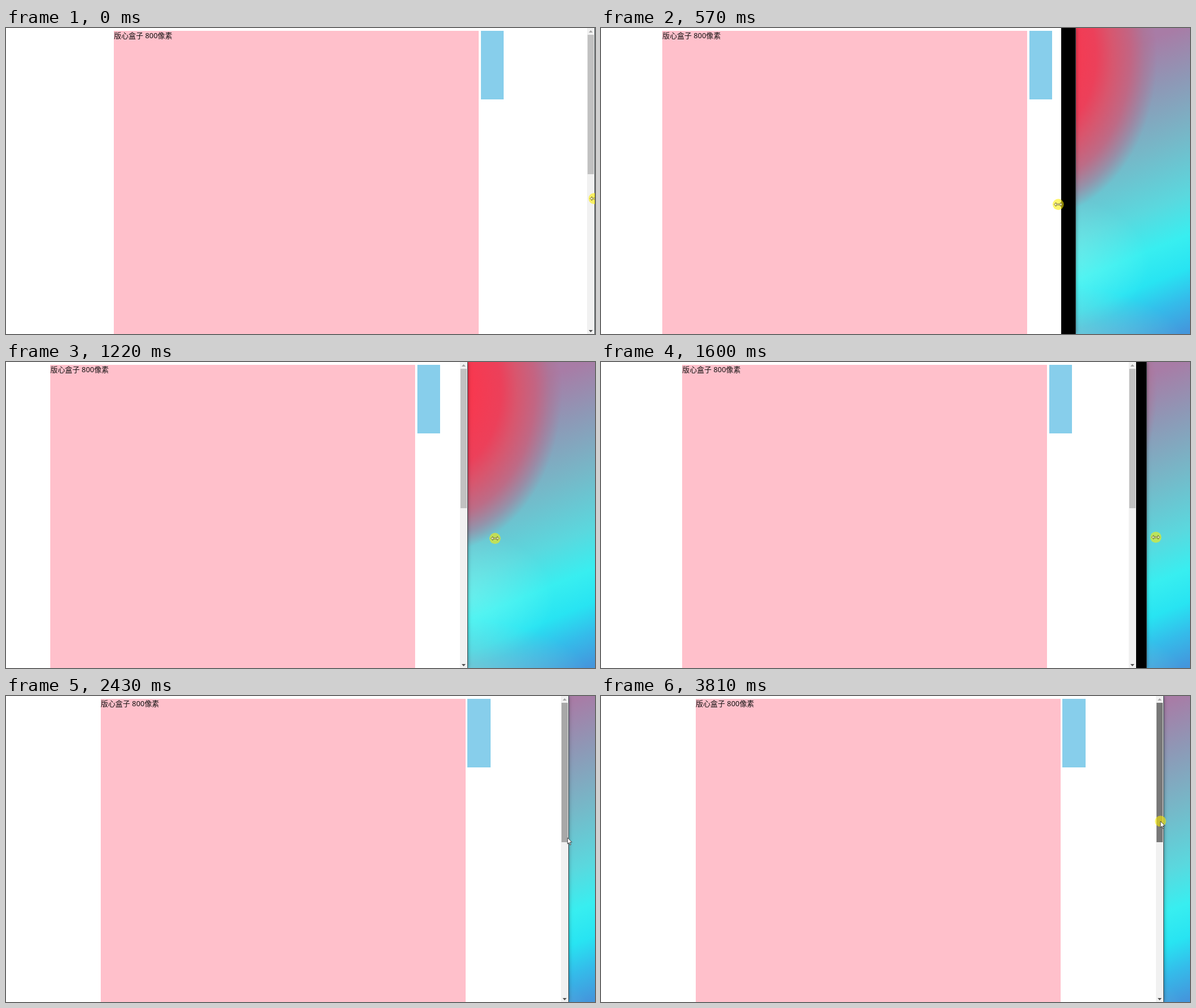
These frames come from a looping animation (1038x540 px, 3.86 s). An HTML page:

```html
<!DOCTYPE html>
<html lang="zh">
<head>
<meta charset="utf-8">
<title>版心盒子</title>
<style>
html, body { margin: 0; width: 100%; height: 100%; overflow: hidden; }
body { position: relative; }
div, svg { position: absolute; }
#wall {
  left: 760px; top: 0; width: 278px; height: 540px;
  background:
    radial-gradient(215px 285px at 5px 50px, #f8384f 0 25%, #ec405a 50%, #d8566e 63%, #c8607cd8 78%, #b0708f88 90%, #a080a000),
    radial-gradient(170px 120px at 35px 415px, #90fff477, #90fff400),
    radial-gradient(270px 110px at 0 560px, #8cc4ccee, #8cc4cc00),
    linear-gradient(158deg, #a87ca6 16%, #8e98b6 30%, #76b8c8 46%, #5ad8de 62%, #38eef0 73%, #28e4f2 82%, #34bcea 90%, #4496dc 99%);
}
#win { left: 0; top: 0; height: 540px; background: #000; box-shadow: 0 0 7px #0008; }
#win::after { content: ""; position: absolute; left: 100%; top: 0; width: 1px; height: 100%; background: #3a464a; }
#view { left: 0; top: 0; height: 100%; overflow: hidden; background: #fff; }
#box {
  top: 5px; width: 642.5px; height: 1122px; background: #ffc0cb; color: #111;
  font: 12.9px/17px "Noto Sans", "Noto Sans CJK SC", "Noto Sans CJK", sans-serif; white-space: nowrap;
}
#side { top: 5px; width: 40.2px; height: 121px; background: skyblue; }
#bar { top: 0; width: 13.5px; height: 540px; background: #f1f1f1; }
#thumb { left: 1px; top: 12px; width: 11px; height: 246px; }
#bar svg { left: 3px; width: 7px; height: 4px; }
#up { top: 4px; }
#down { top: 533px; fill: #505050; }
#cursor { left: 0; top: 0; width: 40px; height: 40px; margin: -20px 0 0 -20px; }
</style>
</head>
<body>
<div id="wall"></div>
<div id="win">
  <div id="view">
    <div id="box">版心盒子 800像素</div>
    <div id="side"></div>
    <div id="bar">
      <svg id="up" viewBox="0 0 7 4"><path d="M0 4L3.5 0 7 4Z"/></svg>
      <div id="thumb"></div>
      <svg id="down" viewBox="0 0 7 4"><path d="M0 0L3.5 4 7 0Z"/></svg>
    </div>
  </div>
</div>
<svg id="cursor" viewBox="-20 -20 40 40">
  <circle id="press" r="9.8" fill="#fff000" fill-opacity=".58"/>
  <path id="resize" d="M-7.3 0L-3.8-3.4V-1H3.8V-3.4L7.3 0 3.8 3.4V1H-3.8V3.4Z" fill="#fff" fill-opacity=".6" stroke="#5c5220" stroke-width=".8"/>
  <path id="arrow" d="M0 0V11L2.6 8.7 4.4 13 6.1 12.2 4.3 8H7.8Z" fill="#fff" stroke="#222" stroke-width=".8"/>
</svg>
<script>
const LOOP = 3860, START = 140, TICK = 50, BEAT = 280;
const GRAB_TIME = 2530, GRAB_Y = 257, SCROLL_RATIO = 2.19;
const $ = id => document.getElementById(id);
const [win, view, box, side, bar, thumb, up, cursor, press, resize, arrow] =
  ['win', 'view', 'box', 'side', 'bar', 'thumb', 'up', 'cursor', 'press', 'resize', 'arrow'].map($);

// Sine ease from 0 to 1 between times a and b
function ease(t, a, b) {
  const f = Math.min(1, Math.max(0, (t - a) / (b - a)));
  return (1 - Math.cos(Math.PI * f)) / 2;
}

const pullIn = t => ease(t, 100, 720);
const pullOut = t => ease(t, 720, 1745);
const dragX = t => 1036.4 - 267.4 * pullIn(t) + 221 * pullOut(t);

const pointerX = t => dragX(t) - 4 * ease(t, 2380, 2600);
const pointerY = t => 301 + 12 * pullIn(t) - 4 * pullOut(t) - 59 * ease(t, 1930, 2430)
  + 142 * ease(t, 2690, 3170) - 171 * ease(t, 3260, 3780);

// The window and its page follow the pointer with different delays
function windowEdges(t, tick) {
  const shrinking = t >= START && t < 850;
  const layout = dragX(t - (shrinking ? 115 : 160)) + 1.1;
  if (shrinking) return { layout, painted: dragX(t - 15) - 2, outer: dragX(t - 52) + 3 };
  const outer = tick % 2 ? dragX(t - 87) + 1 : layout;
  return { layout, painted: Math.min(layout, outer), outer };
}

function draw(now) {
  let t = now % LOOP, tick = 0;
  if (t < START) {
    t = 0;
  } else {
    const u = (t - START) % BEAT;
    tick = Math.floor(u / TICK);
    t -= u % TICK;
  }
  const x = pointerX(t), y = pointerY(t);
  const { layout, painted, outer } = windowEdges(t, tick);
  const dragging = t >= GRAB_TIME;
  const drag = dragging ? Math.max(0, y - GRAB_Y) : 0;
  const pageWidth = layout - 13.5, left = pageWidth / 2 - 321.7;

  win.style.width = Math.floor(outer) + 'px';
  view.style.width = painted + 'px';
  box.style.left = left + 'px';
  box.style.top = 5 - drag * SCROLL_RATIO + 'px';
  side.style.left = left + 646.3 + 'px';
  bar.style.left = pageWidth + 'px';
  thumb.style.top = 12 + drag + 'px';
  thumb.style.background = dragging ? '#787878' : t >= 2380 ? '#a8a8a8' : '#c1c1c1';
  up.style.fill = drag > 0 ? '#505050' : '#a3a3a3';

  const resizing = t < 2000;
  cursor.style.transform = `translate(${x}px, ${y}px)`;
  press.style.display = t < 1900 || dragging ? '' : 'none';
  resize.style.display = resizing ? '' : 'none';
  arrow.style.display = resizing ? 'none' : '';
}

const origin = performance.now();
function loop() {
  draw(performance.now() - origin);
  requestAnimationFrame(loop);
}
loop();
</script>
</body>
</html>
```
